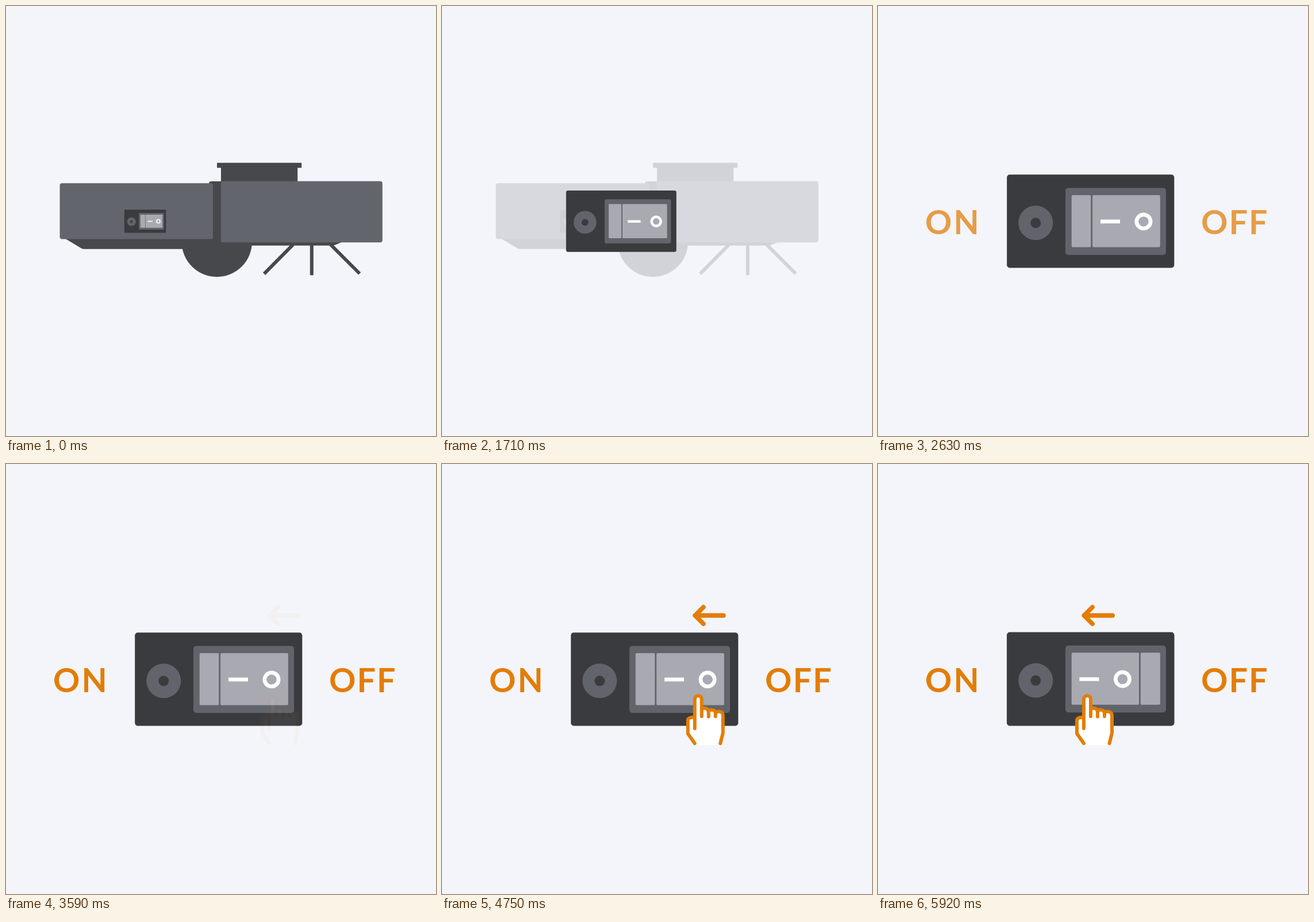
Write an HTML page with a canvas that moves like this. It is 748 px wide and 748 px high and loops after 5960 ms.

```html
<!DOCTYPE html>
<html lang="en">
<head>
<meta charset="utf-8">
<title>Power switch</title>
<style>
html, body { margin: 0; width: 100%; height: 100%; overflow: hidden; background: #f3f5fa; }
canvas { display: block; width: 748px; height: 748px; }
</style>
</head>
<body>
<canvas id="stage" width="748" height="748"></canvas>
<script>
const SIZE = 748, LOOP = 5960;
const BG = '#f3f5fa', DARK = '#47484c', BODY = '#62656b', PANEL = '#3a3b3e',
      BEZEL = '#62646b', KEY = '#a9a9b1', WHITE = '#fff', ORANGE = '#e37d05';

const stage = document.getElementById('stage').getContext('2d');
const buffer = document.createElement('canvas');
buffer.width = buffer.height = SIZE;
const layer = buffer.getContext('2d');

const progress = (t, start, length) => Math.min(1, Math.max(0, (t - start) / length));
const easeOut = p => 1 - (1 - p) * (1 - p);
const smooth = (t, start, length) => {
  const p = progress(t, start, length);
  return p * p * (3 - 2 * p);
};
const mix = (a, b, p) => a + (b - a) * p;

// Paints a whole drawing at one opacity.
function fade(alpha, paint) {
  if (alpha <= 0) return;
  layer.clearRect(0, 0, SIZE, SIZE);
  paint(layer);
  stage.globalAlpha = alpha;
  stage.drawImage(buffer, 0, 0);
  stage.globalAlpha = 1;
}

function box(c, color, x1, y1, x2, y2, r = 0) {
  c.fillStyle = color;
  c.beginPath();
  c.roundRect(x1, y1, x2 - x1, y2 - y1, r);
  c.fill();
}

function disc(c, color, x, y, r) {
  c.fillStyle = color;
  c.beginPath();
  c.arc(x, y, r, 0, 2 * Math.PI);
  c.fill();
}

function shape(c, color, path) {
  c.fillStyle = color;
  c.fill(new Path2D(path));
}

function line(c, color, width, path, cap = 'butt') {
  c.strokeStyle = color;
  c.lineWidth = width;
  c.lineCap = cap;
  c.lineJoin = 'round';
  c.stroke(new Path2D(path));
}

function panel(c, on) {
  box(c, PANEL, 224.2, 293.2, 515.3, 455.5, 5);
  disc(c, BEZEL, 274.3, 377.3, 30);
  disc(c, PANEL, 274.3, 377.3, 9);
  box(c, BEZEL, 326, 316.5, 501, 433, 5);
  const split = on ? 454 : 370.3;
  box(c, KEY, 336.7, 328.9, split, 419.4, 2);
  box(c, KEY, split + 2.8, 328.9, 490.8, 419.4, 2);
  const dx = on ? -36.6 : 0;
  box(c, WHITE, 387 + dx, 371.6, 421 + dx, 378.2);
  c.strokeStyle = WHITE;
  c.lineWidth = 6.7;
  c.beginPath();
  c.arc(462 + dx, 374.9, 12.1, 0, 2 * Math.PI);
  c.stroke();
}

function zoomedPanel(c, p) {
  const k = mix(72.5 / 291.1, 1, p);
  c.save();
  c.translate(mix(205.8, 224.2, p), mix(354.2, 293.2, p));
  c.scale(k, k);
  c.translate(-224.2, -293.2);
  panel(c, false);
  c.restore();
}

function device(c) {
  box(c, DARK, 353, 305, 400, 412, 4);
  box(c, DARK, 367, 272.8, 514.2, 281.4, 1);
  box(c, DARK, 374, 280, 507.2, 308);
  shape(c, DARK, 'M102 404 L131 421.5 Q133 422.8 136 422.8 H380 V404 Z');
  shape(c, DARK, 'M380 409 V416.8 H566 Q570 416.8 573 415.6 L586 410 Z');
  disc(c, DARK, 366.8, 410, 61.2);
  line(c, DARK, 6, 'M499.5 414.8 L449 465.8 M531.8 414 V468.2 M564.5 414.8 L615.2 465.5');
  box(c, BODY, 93.6, 308.2, 360, 405.4, 4);
  box(c, BODY, 373.8, 304.8, 654.8, 411.2, 4);
  zoomedPanel(c, 0);
}

function words(c) {
  c.fillStyle = ORANGE;
  c.font = '700 57.5px Lato, "Open Sans", sans-serif';
  const put = (word, left, gap) => {
    c.letterSpacing = gap + 'px';
    c.fillText(word, left + c.measureText(word).actualBoundingBoxLeft, 397.2);
  };
  put('ON', 84, 3);
  put('OFF', 564, 2);
}

function pointer(c, shift) {
  c.save();
  c.translate(464 - shift, 0);
  shape(c, WHITE, 'M-5 489 L-18 469 V446 Q-18 441 -13 441 L-6 442 V409 A6 6 0 0 1 6 409 ' +
    'V427 L18 427 L30 431 Q43 429 43 437 V468 L38.5 489 Z');
  line(c, ORANGE, 6, 'M-6 486 L-18 469 V446 C-18 441 -12 440.5 -7 440.5 ' +
    'M-6 460 V409 A6 6 0 0 1 6 409 V439 ' +
    'M6 427 C8 424 18 423 18 432 V439.5 ' +
    'M18 430 C20 427 30 426 30 434 V439 ' +
    'M30 433 C32 429.5 43 428.5 43 438 V468 L38.5 486', 'round');
  line(c, ORANGE, 8, 'M9 249 L-5.5 263.5 L9 278 M-5.5 263.5 H44', 'round');
  c.restore();
}

function draw(t) {
  stage.fillStyle = BG;
  stage.fillRect(0, 0, SIZE, SIZE);
  fade(1 - smooth(t, 988, 1000), device);
  if (t > 988) zoomedPanel(stage, smooth(t, 1175, 1010));
  fade(smooth(t, 4725, 1000), c => {
    c.save();
    c.translate(0, -0.7);
    panel(c, true);
    c.restore();
  });
  fade(easeOut(progress(t, 2505, 260)), words);
  fade(smooth(t, 3480, 1000), c => pointer(c, 100 * smooth(t, 4478, 1000)));
}

function tick() {
  draw(performance.now() % LOOP);
  requestAnimationFrame(tick);
}
tick();
</script>
</body>
</html>
```
